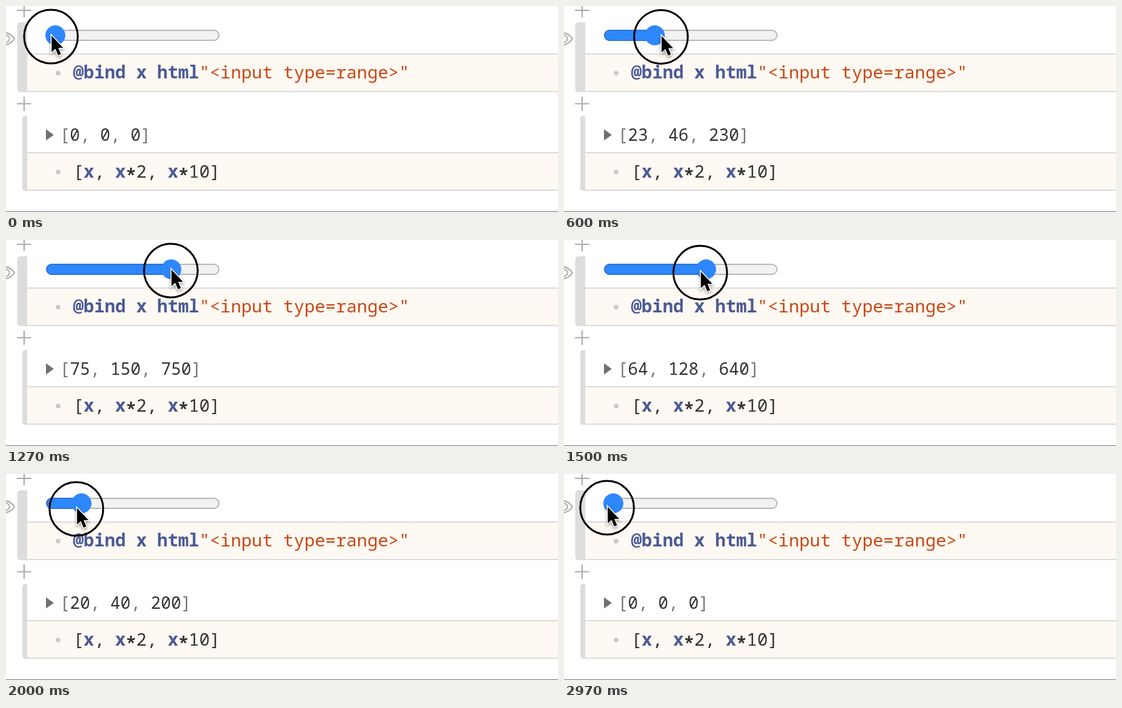
These frames come from a looping animation (884x330 px, 3010 ms). An HTML page:

```html
<!DOCTYPE html>
<html lang="en">
<head>
<meta charset="utf-8">
<title>Reactive slider</title>
<style>
  html, body { margin: 0; width: 100%; height: 100%; overflow: hidden; background: #fff; }
  svg { display: block; }
  text { font: 500 28.05px "Noto Sans Mono", "DejaVu Sans Mono", monospace; fill: #333; white-space: pre; }
  .name { font-weight: 600; fill: #4a5a96; }
  .star { font-weight: 700; }
  .string { fill: #cc4512; }
  #output { font-size: 27px; fill: #777; }
  #output .num { fill: #333; }
  .code { fill: #fef9f2; stroke: #dcdcdc; stroke-width: 2; }
  .bar { fill: #ddd; }
  .icon { fill: none; stroke: #aaa; stroke-width: 2; }
  .dot { fill: #c9c9c9; }
</style>
</head>
<body>
<svg width="884" height="330" viewBox="0 0 884 330">
  <path class="icon" d="M17.5 7H40.5M29 -4V18M17.5 156.5H40.5M29 145V168"/>
  <path class="icon" d="M-1 43Q8 44 13.5 52.5Q8 61 -1 62M0 47A5.5 5.5 0 0 1 0 58"/>

  <rect class="code" x="30" y="77" width="860" height="60"/>
  <rect class="code" x="30" y="235" width="860" height="60"/>
  <path class="bar" d="M34 26H24Q18 26 18 32V132Q18 138 24 138H34Z"/>
  <path class="bar" d="M34 176H31Q26 176 26 182V290Q26 296 31 296H34Z"/>
  <rect y="329" width="884" height="1" fill="#777"/>

  <circle class="dot" cx="83.5" cy="107.5" r="3.7"/>
  <circle class="dot" cx="83.5" cy="266" r="3.7"/>
  <path d="M64 197.5L76.5 206.5L64 215.5Z" fill="#707070"/>

  <text x="107.5" y="115.5"><tspan class="name">@bind x html</tspan><tspan class="string">"&lt;input type=range&gt;"</tspan></text>
  <text id="output" x="86" y="216"></text>
  <text id="formula" x="107.5" y="274.5"></text>

  <rect x="65" y="39" width="276" height="16" rx="8" fill="#f2f2f2" stroke="#b8b8b8" stroke-width="2"/>
  <rect id="fill" x="65" y="39" height="16" rx="8" fill="#2f87fe" stroke="#2c74d2" stroke-width="2"/>
  <circle id="thumb" cy="47" r="16" fill="#2f87fe"/>

  <g id="pointer">
    <circle r="43" fill="none" stroke="#000" stroke-width="3"/>
    <path d="M1 -1.5V25L7 19.5L11.5 30L16 28L11.7 18H19.5Z" stroke="#fff" stroke-width="3"
      style="paint-order:stroke;filter:drop-shadow(0 2px 2px #0006)"/>
  </g>
</svg>
<script>
const $ = id => document.getElementById(id);
const LOOP = 3010, FRAME = 100 / 3, LAST = 89;
const MIN = 79, MAX = 327;

// Pointer path: [frame, x, y]
const path = [
  [0, 72, 49], [4, 71, 49.5], [9, 86, 50], [10, 89.5, 50], [11, 94, 50],
  [23, 198, 49], [24, 203, 49], [25, 212, 49], [33, 261, 48.5], [36, 265, 49],
  [38, 264, 49], [49, 183, 55.5], [50, 176, 56.5], [51, 173, 57], [52, 170, 57],
  [64, 84.5, 55], [67, 71, 54], [72, 69, 54], [LAST, 69, 54]
];

const slope = (i, k) => path[i + 1] && path[i]
  ? (path[i + 1][k] - path[i][k]) / (path[i + 1][0] - path[i][0]) : 0;

// Tangent that never overshoots a knot
function tangent(i, k) {
  const a = slope(i - 1, k), b = slope(i, k);
  return a * b > 0 ? 2 * a * b / (a + b) : 0;
}

// Cubic Hermite interpolation of column k
function at(n, k) {
  n = Math.max(0, n);
  let i = 0;
  while (i < path.length - 2 && path[i + 1][0] <= n) i++;
  const [p, q] = [path[i], path[i + 1]], d = q[0] - p[0], s = (n - p[0]) / d, r = 1 - s;
  return p[k] * r * r * (1 + 2 * s) + q[k] * s * s * (3 - 2 * s)
    + d * s * r * (tangent(i, k) * r - tangent(i + 1, k) * s);
}

const slider = n => Math.min(MAX, Math.max(MIN, at(n, 1)));

$('formula').innerHTML = '[x, x*2, x*10]'
  .replace(/x/g, '<tspan class="name">x</tspan>')
  .replace(/\*(\d+)/g, '<tspan class="star" dy="6">*</tspan><tspan dy="-6">$1</tspan>');

function draw(now) {
  const n = Math.min(LAST, Math.floor((now % LOOP + 4) / FRAME));
  // The slider trails the pointer by a frame, the result by two
  const thumb = slider(n - 1);
  const x = Math.round((slider(n - 2) - MIN) / (MAX - MIN) * 100);
  $('pointer').setAttribute('transform', `translate(${at(n, 1)} ${at(n, 2)})`);
  $('thumb').setAttribute('cx', thumb);
  $('fill').setAttribute('width', thumb - 65);
  $('fill').style.display = thumb > MIN ? '' : 'none';
  $('output').innerHTML = '[' + [x, x * 2, x * 10]
    .map(v => `<tspan class="num">${v}</tspan>`).join(', ') + ']';
}

let start;
function tick(now) {
  start ??= now;
  draw(now - start);
  requestAnimationFrame(tick);
}
draw(0);
requestAnimationFrame(tick);
</script>
</body>
</html>
```
